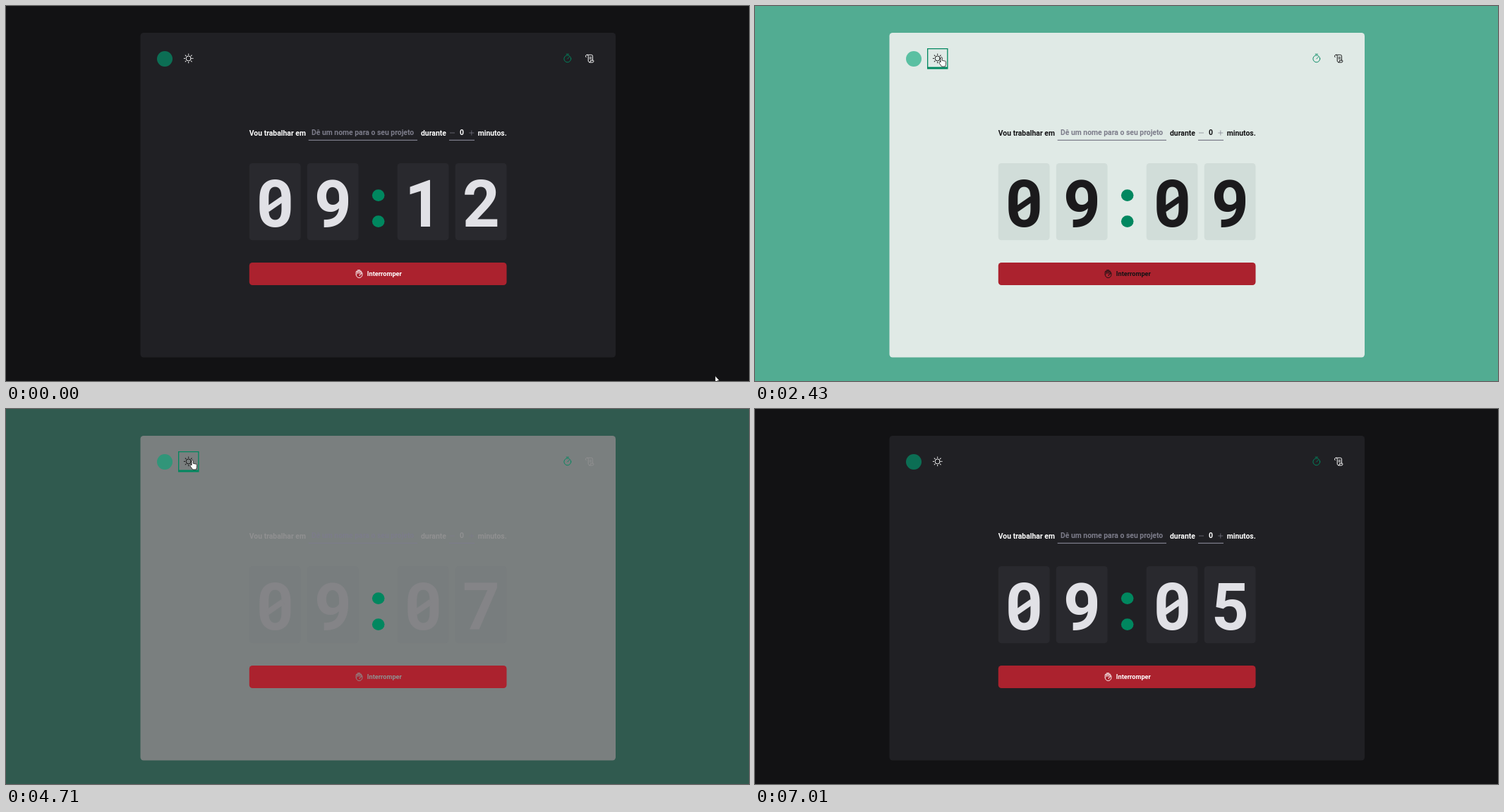
Animation of 1053x532 px, one loop 7.14 s. Source, as an HTML page:

```html
<!DOCTYPE html>
<html lang="pt-BR">
<head>
<meta charset="utf-8">
<title>Cronômetro</title>
<style>
  :root {
    --light: 0%;
    --page: color-mix(in srgb, #121214, #52ac92 var(--light));
    --panel: color-mix(in srgb, #202024, #e0eae6 var(--light));
    --tile: color-mix(in srgb, #29292e, #d1ddd9 var(--light));
    --ink: color-mix(in srgb, #e1e1e6, #1b1a1c var(--light));
    --bright: color-mix(in srgb, #ffffff, #121214 var(--light));
    --green: #00875f;
    --muted: #7c7c8a;
  }
  html, body { margin: 0; width: 100%; height: 100%; overflow: hidden; background: var(--page); }
  svg { display: block; width: 100%; height: 100%; }
  text { font: 700 10.4px Roboto, sans-serif; fill: var(--bright); }
  .hint { fill: var(--muted); }
  .mid { text-anchor: middle; }
  .action { font-size: 9.2px; }
  .icon { fill: none; stroke: var(--bright); stroke-width: .95; stroke-linecap: round; stroke-linejoin: round; }
  .icon.on { stroke: var(--green); }
  .rule { stroke: var(--muted); stroke-width: 1.1; fill: none; }
  .step { stroke: var(--muted); stroke-width: .7; fill: none; }
  .tile { fill: var(--tile); }
  .digit text { font-size: 92px; fill: var(--ink); text-anchor: middle; }
  .digit path { stroke: var(--ink); stroke-width: 8; }
  .pointer { fill: #fff; stroke: #000; stroke-width: .7; stroke-linejoin: round; }
</style>
</head>
<body>
<svg viewBox="0 0 1053 532">
  <rect width="1053" height="532" fill="var(--page)"/>
  <rect x="190.5" y="38" width="673.5" height="460.5" rx="4.5" fill="var(--panel)"/>

  <circle cx="225" cy="75" r="11" fill="#00a375" opacity=".6"/>

  <g id="focus" fill="var(--green)">
    <path fill-rule="evenodd" d="M244 60h29.5v29.5H244zM245.3 61.3v25.2h26.9V61.3z"/>
  </g>
  <g id="sun" class="icon" transform="translate(258.7 74.4)"><circle r="3.5"/></g>

  <g class="icon on">
    <circle cx="795.8" cy="74.9" r="4.9"/>
    <path d="M794.2 68.3h3.2M795.8 74.9l2.3-2.3"/>
  </g>
  <path class="icon" d="M822 72.6a1.9 1.9 0 1 1 3.2-1.4v7a1.8 1.8 0 0 0 3.5 0c0-.6-.5-1.1-.5-1.1h4.2s.5.5.5 1.1a1.8 1.8 0 0 1-1.8 1.8h-4.2M823.4 69.3h6.2a1.8 1.8 0 0 1 1.8 1.8v6M827 72.7h2.6M827 74.8h2.6"/>

  <text x="344.8" y="183.5">Vou trabalhar em</text>
  <text x="433" y="183" class="hint">Dê um nome para o seu projeto</text>
  <text x="588" y="183.5">durante</text>
  <text x="646" y="183" class="mid">0</text>
  <text x="668.7" y="183.5">minutos.</text>
  <path class="rule" d="M428.7 190.4h154.3M628 190.4h36"/>
  <path class="step" d="M629 180h7M656.3 180h7M659.8 176.5v7"/>

  <g id="clock"></g>
  <g fill="var(--green)">
    <ellipse cx="527.7" cy="268.6" rx="8.8" ry="8.4"/>
    <ellipse cx="527.7" cy="305.6" rx="8.8" ry="8.4"/>
  </g>

  <rect x="344.8" y="364" width="364.7" height="32" rx="4.5" fill="#ab222e"/>
  <path class="icon" d="M496.2 381v-3.8a.95.95 0 0 1 1.9 0v2.6M498.1 377.4v-2a.95.95 0 0 1 1.9 0v3.8M500 376v-.6a.95.95 0 0 1 1.9 0v4M501.9 377a.95.95 0 0 1 1.9 0v2.9a2.7 2.7 0 0 0-2.7 2.7M503.8 378.6a.6.6 0 0 1 1.1.3v2.3a4.35 4.35 0 0 1-8.7 0"/>
  <text x="511.8" y="383.2" class="action">Interromper</text>

  <path id="arrow" class="pointer" d="M0 0V9.5L2.1 7.5 3.6 11 5 10.4 3.6 7H6.4z"/>
  <path id="hand" class="pointer" d="M-.9 6.5V.3a1.1 1.1 0 0 1 2.2 0V4l4 .8a1.3 1.3 0 0 1 1.2 1.4V9l-1 3.6H.7L-2.9 7.7a1.1 1.1 0 0 1 2-1.2z"/>
</svg>
<script>
  const LOOP = 7140, FRAME = 70, FADE = 550;
  const $ = id => document.getElementById(id);

  // Each click swaps the sun at once; the palette fades from its own start.
  const clicks = [
    { at: 1420, fade: 1330, light: 1 },
    { at: 2690, fade: 2815, light: 0 },
    { at: 4440, fade: 4555, light: 1 },
    { at: 5450, fade: 5580, light: 0 }
  ];
  const ticks = [500, 1420, 2430, 3240, 3840, 5650, 6610];
  const route = [
    [0, 1005, 524.5], [730, 301, 84], [1220, 264, 73.3], [5650, 264, 73.3],
    [6140, 952, 352], [6210, 1046, 436], [6280, 1100, 500], [LOOP, 1100, 500]
  ];

  const clamp = v => Math.min(1, Math.max(0, v));
  const smooth = v => v * v * (3 - 2 * v);
  const bezier = (a, b, u) => 3 * a * u * (1 - u) ** 2 + 3 * b * u * u * (1 - u) + u ** 3;

  // The CSS "ease" curve.
  function ease(x) {
    let low = 0, high = 1;
    for (let i = 0; i < 20; i++) {
      const u = (low + high) / 2;
      if (bezier(.25, .25, u) < x) low = u; else high = u;
    }
    return bezier(.1, 1, low);
  }

  function pointerAt(t) {
    const i = route.findIndex((p, n) => n && t < p[0]);
    const [t0, x0, y0] = route[i - 1], [t1, x1, y1] = route[i];
    const raw = (t - t0) / (t1 - t0);
    const k = t0 < 5000 ? smooth(raw) : t1 === 6140 ? raw ** 1.4 : raw;
    return [x0 + (x1 - x0) * k, y0 + (y1 - y0) * k];
  }

  $('sun').innerHTML += Array.from({ length: 8 }, (_, i) =>
    `<path d="M0-5.1V-6.4" transform="rotate(${i * 45})"/>`).join('');

  $('clock').innerHTML = [344.8, 426.8, 554.7, 636.7].map(x => `
    <rect class="tile" x="${x}" y="223" width="72.8" height="109.3" rx="4.5"/>
    <g class="digit" transform="translate(${x + 36.6} 0)">
      <text y="313.4"></text><path d="M-11 288.6L11 273.4"/>
    </g>`).join('');
  const digits = [...document.querySelectorAll('.digit')];

  function draw(t) {
    const last = clicks.filter(c => t >= c.at).pop();
    let light = 0;
    if (last) {
      const step = Math.floor((t - last.at) / 67) * 67 + last.at;
      const k = ease(clamp((step - last.fade) / FADE));
      light = last.light ? k : 1 - k;
    }
    document.documentElement.style.setProperty('--light', light * 100 + '%');
    $('sun').style.stroke = last && last.light ? '#121214' : '#fff';

    const seconds = 12 - ticks.filter(at => t >= at).length;
    const time = '09' + String(seconds).padStart(2, '0');
    digits.forEach((digit, i) => {
      digit.firstElementChild.textContent = time[i];
      digit.lastElementChild.style.display = time[i] === '0' ? '' : 'none';
    });

    const held = Math.max(0, Math.floor((t - 50) / FRAME) * FRAME + 50);
    const [x, y] = pointerAt(held);
    const over = x < 274;
    $('focus').style.display = t < 7010 && (over || t > 1420) ? '' : 'none';
    for (const id of ['arrow', 'hand']) {
      $(id).setAttribute('transform', `translate(${x} ${y})`);
      $(id).style.display = (id === 'hand') === over ? '' : 'none';
    }
  }

  const start = performance.now();
  function loop() {
    draw((performance.now() - start) % LOOP);
    requestAnimationFrame(loop);
  }
  loop();
</script>
</body>
</html>
```
